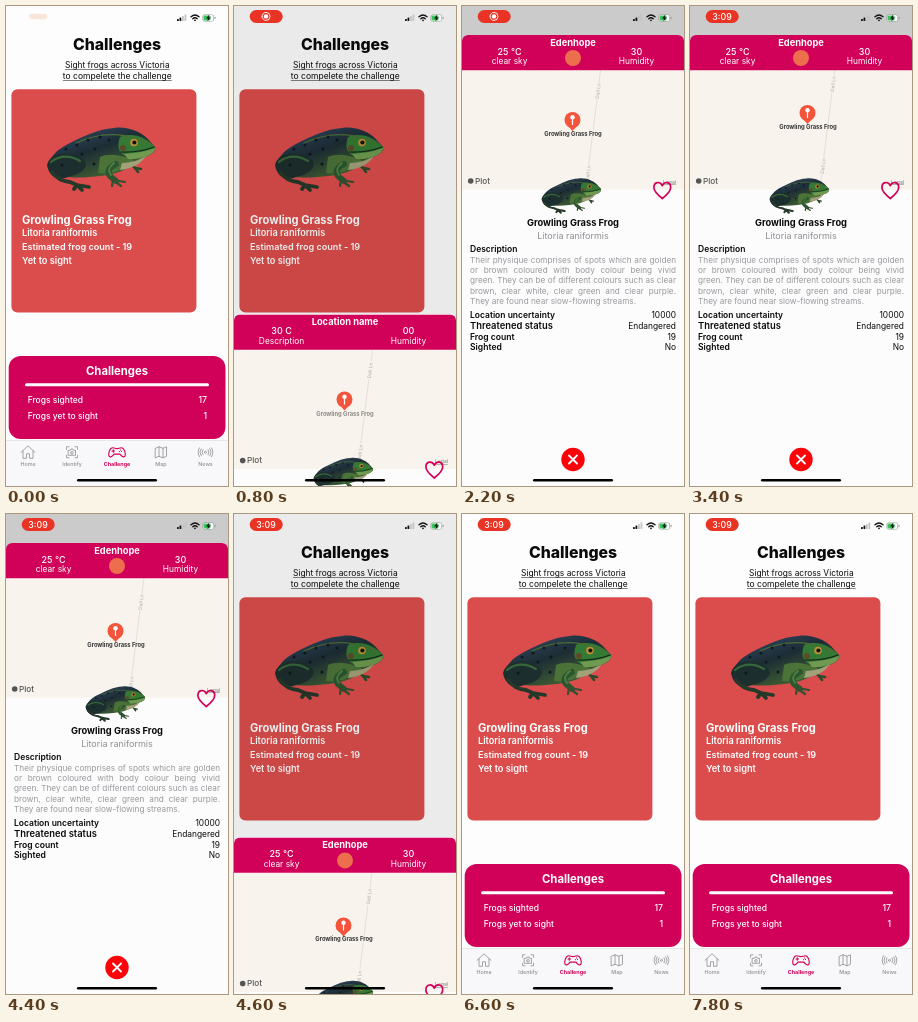
These frames come from a looping animation (222 by 480 pixels, 8000 ms). An HTML page with a canvas:

```html
<!DOCTYPE html>
<html lang="en">
<head>
<meta charset="utf-8">
<title>Frog challenge</title>
<style>
  html, body { margin: 0; width: 100%; height: 100%; overflow: hidden; background: #fff; }
  canvas { display: block; width: 222px; height: 480px; }
</style>
</head>
<body>
<canvas id="stage"></canvas>
<script>
const W = 222, H = 480, LOOP = 8000, STEP = 200;
const SHEET_TOP = 29, SHEET_TRAVEL = H - SHEET_TOP;
const PINK = '#d10058', GREY = '#8e8e93', INK = '#0a0a0a';

const canvas = document.getElementById('stage');
const ctx = canvas.getContext('2d');
const ratio = window.devicePixelRatio || 1;
canvas.width = W * ratio;
canvas.height = H * ratio;

const clamp = v => Math.max(0, Math.min(1, v));
const smooth = v => { v = clamp(v); return v * v * (3 - 2 * v); };
// Remaining distance of a critically damped spring, from 1 to 0
const spring = (t, start) => {
  const p = Math.max(0, t - start) * 0.0132;
  return (1 + p) * Math.exp(-p);
};

function at(x, y, scale, draw) {
  ctx.save();
  ctx.translate(x, y);
  ctx.scale(scale, scale);
  draw();
  ctx.restore();
}

function box(x, y, w, h, radius, color) {
  ctx.fillStyle = color;
  ctx.beginPath();
  ctx.roundRect(x, y, w, h, radius);
  ctx.fill();
}

function disc(x, y, r, color) {
  ctx.fillStyle = color;
  ctx.beginPath();
  ctx.arc(x, y, r, 0, 7);
  ctx.fill();
}

function fill(path, color) {
  ctx.fillStyle = color;
  ctx.fill(new Path2D(path));
}

function stroke(path, color, width) {
  ctx.strokeStyle = color;
  ctx.lineWidth = width;
  ctx.lineCap = ctx.lineJoin = 'round';
  ctx.stroke(new Path2D(path));
}

// y is the middle of the capitals; returns the text width
function text(str, x, y, size, color = INK, weight = 400, align = 'left') {
  ctx.font = `${weight} ${size}px Inter, sans-serif`;
  ctx.fillStyle = color;
  ctx.textAlign = align;
  ctx.fillText(str, x, y + size * 0.35);
  return ctx.measureText(str).width;
}

const centred = (str, x, y, size, color, weight) => text(str, x, y, size, color, weight, 'center');

function underlined(str, x, y, size, color, offset) {
  const width = centred(str, x, y, size, color);
  box(x - width / 2, y + offset, width, 0.6, 0, color);
}

function justified(line, x, y, width, size, color) {
  const words = line.split(' ');
  ctx.font = `400 ${size}px Inter, sans-serif`;
  const widths = words.map(word => ctx.measureText(word).width);
  const gap = (width - widths.reduce((a, b) => a + b)) / (words.length - 1);
  words.forEach((word, i) => {
    text(word, x, y, size, color);
    x += widths[i] + gap;
  });
}

function frog() {
  const back = ctx.createLinearGradient(40, 2, 56, 48);
  back.addColorStop(0, '#2b4258');
  back.addColorStop(0.45, '#1d2d35');
  back.addColorStop(1, '#3c5a33');
  // far arm
  stroke('M82 34L89 41L95 42M89 41L92 45', '#2b4a2b', 2.6);
  // body
  fill('M2 41C2 32 10 23 22 17C38 9 52 2 68 1C82 -1 94 5 101 11L109 20C111 25 103 29 96 31C90 37 80 43 70 46C52 51 20 52 8 48Z', back);
  fill('M54 30C64 25 78 29 88 33C80 42 66 48 52 46Z', '#4b7338');
  fill('M76 36C86 36 95 32 100 29C95 37 85 42 74 43Z', '#a3a17a');
  // face
  fill('M74 10C87 5 99 10 109 20C110 25 103 29 92 31C80 31 68 27 74 10Z', '#347a34');
  fill('M78 27C92 26 102 24 109 21C109 28 94 33 82 32Z', '#6f9a50');
  stroke('M75 25Q92 26 108 20', '#14241a', 1.2);
  stroke('M30 16Q56 4 80 9L103 16', '#4d6b35', 1.3);
  disc(77, 21, 3, '#5f4a28');
  disc(88, 15.5, 3.8, '#c09038');
  disc(88.4, 15.5, 2.1, '#11150f');
  // hind leg
  fill('M1 38C4 25 24 22 38 33C44 41 33 48 22 50C12 54 3 50 1 38Z', '#1c2e2d');
  stroke('M5 35Q18 25 34 34', '#37663a', 2.2);
  stroke('M6 45Q12 54 24 55L31 58L43 60M31 58L36 63M31 58L28 62', '#26382a', 3.8);
  // front leg
  stroke('M70 37Q58 43 65 50L70 54', '#2d5530', 6);
  stroke('M67 53L79 55M67 53L75 59M67 53L66 59', '#33502f', 2.2);
  stroke('M68 36Q60 42 65 48', '#4d8540', 1.8);
  [[20, 22], [31, 18], [42, 13], [54, 10], [36, 27], [49, 22], [63, 13], [48, 37], [16, 38]]
    .forEach(([x, y]) => disc(x, y, 1.5, '#0e181d'));
}

function tabBar() {
  box(0, 435, W, 45, 0, '#f8f7f9');
  box(0, 434.5, W, 0.5, 0, '#d2d1d4');
  const tabs = [
    ['Home', 22, 'M-7 0L0 -6.5L7 0M-5 -1.5V6H-1.5V1.5H1.5V6H5V-1.5'],
    ['Identify', 66, 'M-5.5 -3V-5.5H-3M3 -5.5H5.5V-3M5.5 3V5.5H3M-3 5.5H-5.5V3M-3.5 -2H-1.5L-1 -3.3H1L1.5 -2H3.5V3H-3.5ZM-1.3 .5A1.3 1.3 0 1 0 1.3 .5A1.3 1.3 0 1 0 -1.3 .5'],
    ['Challenge', 111, 'M-4.3 -4.5C-2 -4.5 -2 -3.7 0 -3.7S2 -4.5 4.3 -4.5C7.3 -4.5 8.7 1 8.2 3.2C7.4 6 4.5 4 3 1.8H-3C-4.5 4 -7.4 6 -8.2 3.2C-8.7 1 -7.3 -4.5 -4.3 -4.5ZM-5 -1.3H-2.4M-3.7 -2.6V0M3.4 -2.4V-2.3M4.5 -1V-.9M2.4 -.8V-.7'],
    ['Map', 155, 'M-5.5 -4L-2 -5.5L2 -4L5.5 -5.5V4L2 5.5L-2 4L-5.5 5.5ZM-2 -5.5V4M2 -4V5.5'],
    ['News', 199.5, 'M-1 0A1 1 0 1 0 1 0A1 1 0 1 0 -1 0M-2.6 -2.4Q-4.2 0 -2.6 2.4M2.6 -2.4Q4.2 0 2.6 2.4M-4.4 -3.5Q-6.8 0 -4.4 3.5M4.4 -3.5Q6.8 0 4.4 3.5M-6 -4.5Q-8.8 0 -6 4.5M6 -4.5Q8.8 0 6 4.5']
  ];
  for (const [label, x, icon] of tabs) {
    const active = label === 'Challenge';
    const color = active ? PINK : GREY;
    at(x, 446.3, 1, () => stroke(icon, color, active ? 1.1 : 0.8));
    centred(label, x, 457.7, 5.4, color, active ? 700 : 500);
  }
}

function challengePage() {
  box(0, 0, W, H, 0, '#fefdfe');
  centred('Challenges', 111, 38.8, 15.8, INK, 800);
  underlined('Sight frogs across Victoria', 111.3, 59.2, 8.4, INK, 4.3);
  underlined('to compelete the challenge', 111.3, 70.2, 8.5, INK, 4.3);

  box(5.4, 83.3, 185, 223.2, 6, '#db4d4c');
  at(40, 121, 1, frog);
  text('Growling Grass Frog', 16, 214, 11.1, '#fff', 700);
  text('Litoria raniformis', 16, 226.6, 9.2, '#fff', 600);
  text('Estimated frog count - 19', 16, 240.8, 9.1, '#fff', 600);
  text('Yet to sight', 16, 255.2, 9.2, '#fff', 600);

  box(2.7, 350, 216.8, 83, 12, PINK);
  centred('Challenges', 111, 365.2, 11.3, '#fff', 700);
  box(19, 377.2, 184, 3, 1.5, '#fff');
  [['Frogs sighted', '17', 394], ['Frogs yet to sight', '1', 410]].forEach(([label, value, y]) => {
    text(label, 21.7, y, 8.5, '#fff', 500);
    text(value, 201, y, 8.7, '#fff', 500, 'right');
  });
  tabBar();
}

function mapView(t) {
  ctx.save();
  ctx.beginPath();
  ctx.rect(0, 64, W, 119.5);
  ctx.clip();
  box(0, 64, W, 120, 0, '#f8f4ed');

  const out = smooth((t - 2400) / 1000), back = smooth((t - 3400) / 800);
  ctx.save();
  ctx.translate(7 * out - 8 * back, -7 * out + 10 * back);
  stroke('M142.6 32L119.6 216', '#e4e1de', 1.1);
  for (const [x, y] of [[136, 85], [126, 167]]) {
    at(x, y, 1, () => {
      ctx.rotate(-1.445);
      box(-9, -2.5, 18, 5, 0, '#f8f4ed');
      centred('Dell Ln', 0, 0, 4.8, '#a9a6a8');
    });
  }
  disc(110.5, 114, 8, '#f4543c');
  fill('M106 120L110.5 125L115 120Z', '#f4543c');
  disc(110.5, 111.3, 2.2, '#fff');
  stroke('M110.5 113V118.5', '#fff', 1.2);
  ctx.globalAlpha = t < 1400 ? 0.55 : 1;
  centred('Growling Grass Frog', 111, 128, 5.8, '#333', 700);
  ctx.restore();

  disc(8.7, 175, 2.8, '#555');
  text('Plot', 13, 175, 8.2, '#555', 500);
  underlined('Legal', 207.5, 176, 5, '#777', 2.5);
  ctx.restore();
}

function header(t) {
  ctx.save();
  ctx.beginPath();
  ctx.roundRect(0, SHEET_TOP, W, 36, [6, 6, 0, 0]);
  ctx.clip();
  box(0, SHEET_TOP, W, 35.3, 0, PINK);
  ctx.restore();
  const loaded = t >= 1400;
  const [place, degrees, sky, humidity] = loaded
    ? ['Edenhope', '25 °C', 'clear sky', '30']
    : ['Location name', '30 C', 'Description', '00'];
  centred(place, 111, 36.5, 9.3, '#fff', 700);
  centred(degrees, 47.5, 45.5, 9, '#fff', 500);
  centred(sky, 47.5, 55.5, 8.4, '#fff');
  centred(humidity, 174.5, 45.5, 9, '#fff', 500);
  centred('Humidity', 174.5, 55.5, 8.4, '#fff');
  if (loaded) disc(111, 52, 8, '#ec6e4c');
}

function detailSheet(t) {
  box(0, SHEET_TOP, W, H, 6, '#fdfcfd');
  mapView(t);
  header(t);
  at(79, 172, 0.55, frog);
  at(200.3, 184.5, 1, () =>
    stroke('M0 8C-5 4 -8.4 1 -8.4 -3C-8.4 -9 -2 -9.5 0 -4.8C2 -9.5 8.4 -9 8.4 -3C8.4 1 5 4 0 8Z', PINK, 1.7));

  centred('Growling Grass Frog', 111, 217, 9.3, INK, 700);
  centred('Litoria raniformis', 111, 230, 9, GREY);
  text('Description', 8, 243, 8.5, INK, 600);
  const lines = [
    'Their physique comprises of spots which are golden',
    'or brown coloured with body colour being vivid',
    'green. They can be of different colours such as clear',
    'brown, clear white, clear green and clear purple.'
  ];
  lines.forEach((line, i) => justified(line, 8, 253.7 + i * 10.4, 206, 8.2, '#98989d'));
  text('They are found near slow-flowing streams.', 8, 295.3, 8.2, '#98989d');

  const facts = [
    ['Location uncertainty', '10000', 8.5],
    ['Threatened status', 'Endangered', 9.4],
    ['Frog count', '19', 8.6],
    ['Sighted', 'No', 8.6]
  ];
  facts.forEach(([label, value, size], i) => {
    const y = 309 + i * 10.8;
    text(label, 8, y, size, INK, 600);
    text(value, 214, y, 8.4, INK, 400, 'right');
  });

  if (t >= 1400) {
    disc(111, 453.5, 11.7, '#fb0309');
    stroke('M107 449.5L115 457.5M115 449.5L107 457.5', '#fff', 1.8);
  }
}

function statusBar(t) {
  const grow = smooth(t / 400);
  ctx.globalAlpha = 0.25 + 0.75 * grow;
  const w = 18 + 15 * grow, h = 5.5 + 7.5 * grow;
  box(32.2 - w / 2, 10.5 - h / 2, w, h, h / 2, grow ? '#e93425' : '#eba06a');
  ctx.globalAlpha = grow;
  if (t < 2800) {
    stroke('M28 10.4A4 4 0 1 0 36 10.4A4 4 0 1 0 28 10.4', '#fff', 0.9);
    disc(32, 10.4, 2.2, '#fff');
  } else {
    centred('3:09', 32, 10.5, 8.8, '#fff', 500);
  }
  ctx.globalAlpha = 1;

  for (let i = 0; i < 4; i++) {
    const bar = 2 + i * 1.5;
    box(171 + i * 2.5, 15 - bar, 1.8, bar, 0.5, i < 2 ? '#111' : '#c4c4c6');
  }
  stroke('M185 10.7Q189 7.3 193 10.7M186.8 12.7Q189 10.8 191.2 12.7', '#111', 1.4);
  disc(189, 14.3, 0.9, '#111');
  box(196.5, 8.5, 11.5, 7, 2, '#9a9c9b');
  box(197.1, 9.1, 10.3, 5.8, 1.5, '#fff');
  box(197.5, 9.5, 7, 5, 1, '#35c759');
  box(208.5, 10.8, 1, 2.4, 0.5, '#9a9c9b');
  fill('M203.2 8.8L200 12.5H202L201.4 15.3L204.8 11.4H202.7Z', '#111');
}

function render(time) {
  const t = Math.floor((time % LOOP) / STEP) * STEP;
  ctx.setTransform(ratio, 0, 0, ratio, 0, 0);
  challengePage();

  const hidden = t < 4400 ? spring(t, 700) : 1 - spring(t, 4431);
  if (hidden < 0.995) {
    box(0, 0, W, H, 0, `rgba(0, 0, 0, ${0.2 * (1 - hidden)})`);
    at(0, SHEET_TRAVEL * hidden, 1, () => detailSheet(t));
  }
  statusBar(t);
  box(71, 473, 80, 2.6, 1.3, '#000');
}

const start = performance.now();
function tick() {
  render(performance.now() - start);
  requestAnimationFrame(tick);
}
tick();
</script>
</body>
</html>
```
